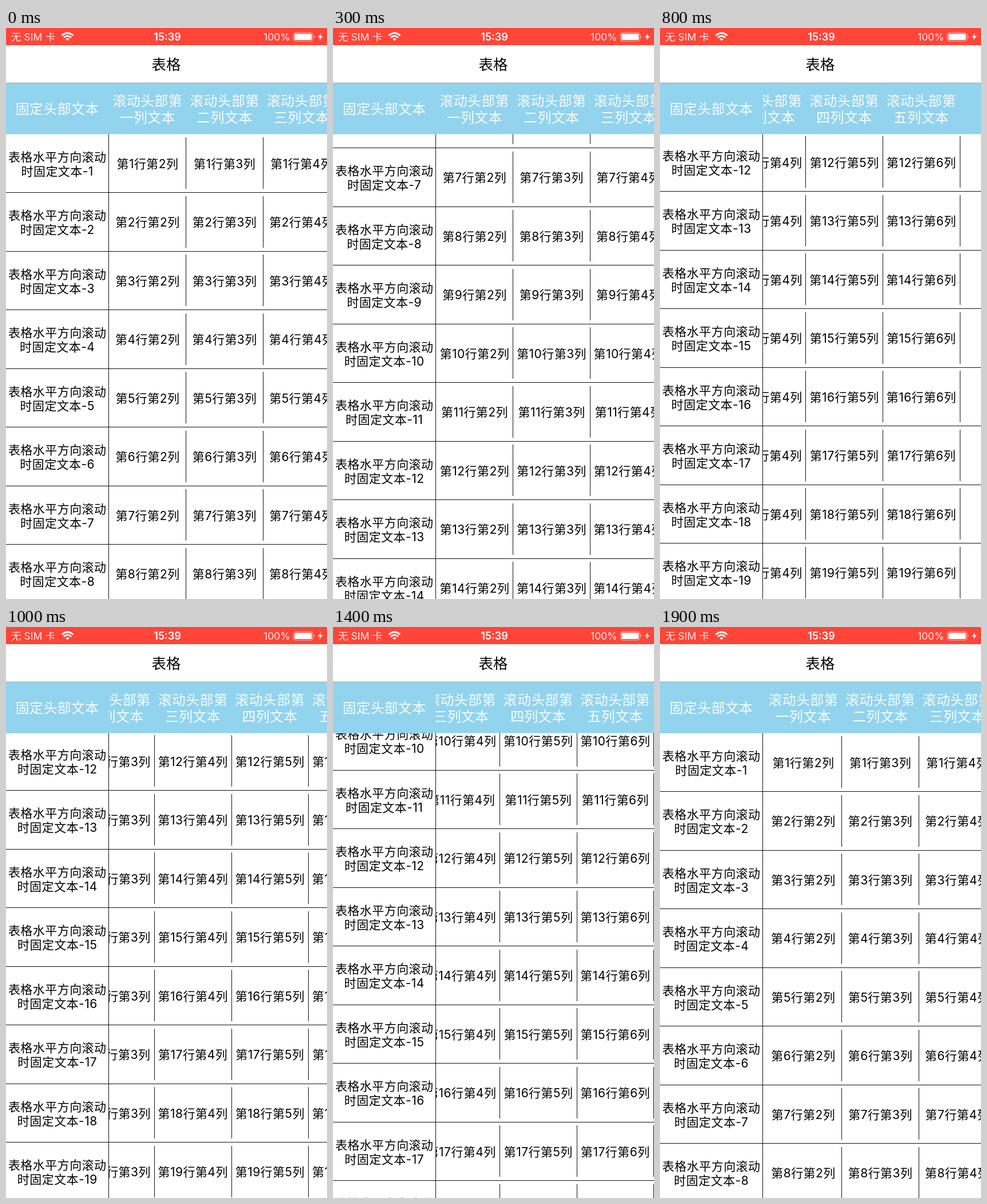
An HTML page that plays this animation: 561 by 998 pixels, repeating every 2 s.

```html
<!DOCTYPE html>
<html lang="zh-CN">
<head>
<meta charset="utf-8">
<title>表格</title>
<style>
  html, body { margin: 0; width: 100%; height: 100%; overflow: hidden; background: #fff; }
  svg { display: block; width: 100vw; height: 100vh; }
  text { font-family: Inter, "Noto Sans CJK SC", "Noto Sans CJK", sans-serif; white-space: pre; }
  .cell { font-size: 21px; letter-spacing: .45px; text-anchor: middle; }
  .head { font-size: 23.9px; letter-spacing: .4px; text-anchor: middle; font-weight: 300; fill: #fff; fill-opacity: .94; }
  .bar { font-size: 17.6px; fill: #fff; fill-opacity: .88; }
  .line { shape-rendering: crispEdges; fill: #111; }
  .blue { fill: #92d3ee; }
</style>
</head>
<body>
<svg viewBox="0 0 561 998">
  <rect width="561" height="998" fill="#fff"/>
  <g id="table">
    <g id="rows"><g id="cells"></g><g id="fixed"></g></g>
    <rect class="line" x="179" y="185" width="1" height="813"/>
    <rect class="blue" y="96" width="561" height="89.5"/>
    <g id="heads"></g>
    <rect class="blue" y="96" width="179.5" height="89.5"/>
    <text class="head" x="89.7" y="150">固定头部文本</text>
  </g>
  <rect width="561" height="96" fill="#fff"/>
  <rect y="95.5" width="561" height="1" fill="#a4a8aa"/>
  <text x="280" y="72.5" font-size="25.4" font-weight="500" text-anchor="middle">表格</text>
  <rect width="561" height="30" fill="#ff4538"/>
  <text class="bar" x="9" y="22">无 SIM 卡</text>
  <g fill="none" stroke="#fff" stroke-width="3">
    <path d="M97.5 13.2Q107.5 4.6 117.5 13.2M101 16.8Q107.5 11.2 114 16.8"/>
    <path d="M104.2 19.2Q107.5 16.6 110.8 19.2L107.5 22.6Z" fill="#fff" stroke="none"/>
  </g>
  <text class="bar" x="282" y="21.5" text-anchor="middle" font-weight="600" style="font-size:18px;fill-opacity:1">15:39</text>
  <text class="bar" x="450" y="22">100%</text>
  <rect x="502" y="8" width="34.5" height="15" rx="4" fill="none" stroke="#fff" stroke-opacity=".6"/>
  <rect x="504" y="10" width="30.5" height="11" rx="2" fill="#fff"/>
  <path d="M538 13q2.6 2.5 0 5z" fill="#fff" fill-opacity=".6"/>
  <path d="M551 9L545 16.4H549L547.4 22L553.6 14.2H549.5Z" fill="#fff"/>
</svg>
<script>
const LOOP = 2000, STEP = 100;
const TOP = 185, ROW = 102.5, LEFT = 180, COL = 134.6;
const ROWS = 20, COLS = 5;

const $ = id => document.getElementById(id);

function add(parent, tag, attrs, content = '') {
  const el = document.createElementNS('http://www.w3.org/2000/svg', tag);
  for (const key in attrs) el.setAttribute(key, attrs[key]);
  el.textContent = content;
  parent.append(el);
}
const label = (parent, kind, x, y, content) => add(parent, 'text', { class: kind, x, y }, content);
const line = (parent, x, y, width, height) => add(parent, 'rect', { class: 'line', x, y, width, height });

function build() {
  const cells = $('cells'), fixed = $('fixed'), heads = $('heads');
  add(fixed, 'rect', { y: TOP, width: 179, height: ROWS * ROW, fill: '#fff' });

  for (let c = 0; c < COLS; c++) {
    const x = LEFT + COL * (c + .5);
    label(heads, 'head', x, 136, '滚动头部第');
    label(heads, 'head', x, 165, '一二三四五'[c] + '列文本');
  }
  for (let r = 1; r <= ROWS; r++) {
    const y = TOP + ROW * (r - 1);
    for (let c = 0; c < COLS; c++) {
      label(cells, 'cell', LEFT + COL * (c + .5) + .2, y + 59.5, `第${r}行第${c + 2}列`);
      line(cells, LEFT + COL * (c + 1) - .25, y + 6, 1, 90);
    }
    label(fixed, 'cell', 89.7, y + 47.5, '表格水平方向滚动');
    label(fixed, 'cell', 89.7, y + 72.5, '时固定文本-' + r);
    line(fixed, 0, y + ROW - .3, 561, 1);
  }
}

// Scroll offsets as [time, value] keys
const scrollY = [[0, 0], [100, 70], [300, 590.5], [500, 1146.5], [700, 1129.5],
  [1300, 1129.5], [1400, 960], [1500, 370], [1600, -17.5], [1700, 0]];
const scrollX = [[600, 0], [800, 329.15], [900, 292.5], [1000, 190], [1100, 40],
  [1200, 134], [1300, 270], [1400, 292.5], [1700, 292.5], [1800, 110], [1900, -3]];

function at(keys, t) {
  if (t <= keys[0][0]) return keys[0][1];
  for (let i = 1; i < keys.length; i++) {
    const [t0, v0] = keys[i - 1], [t1, v1] = keys[i];
    if (t <= t1) return v0 + (v1 - v0) * (t - t0) / (t1 - t0);
  }
  return keys[keys.length - 1][1];
}

const shift = (id, x, y) => $(id).setAttribute('transform', `translate(${x} ${y})`);

function draw(ms) {
  const t = Math.floor(ms % LOOP / STEP) * STEP;
  const x = at(scrollX, t), y = at(scrollY, t);
  shift('table', 0, Math.max(0, -y));   // pulling past the top moves the header too
  shift('rows', 0, -Math.max(0, y));
  shift('cells', -x, 0);
  shift('heads', -x, 0);
}

build();
draw(0);
const start = performance.now();
requestAnimationFrame(function tick(now) {
  draw(Math.max(0, now - start));
  requestAnimationFrame(tick);
});
</script>
</body>
</html>
```
